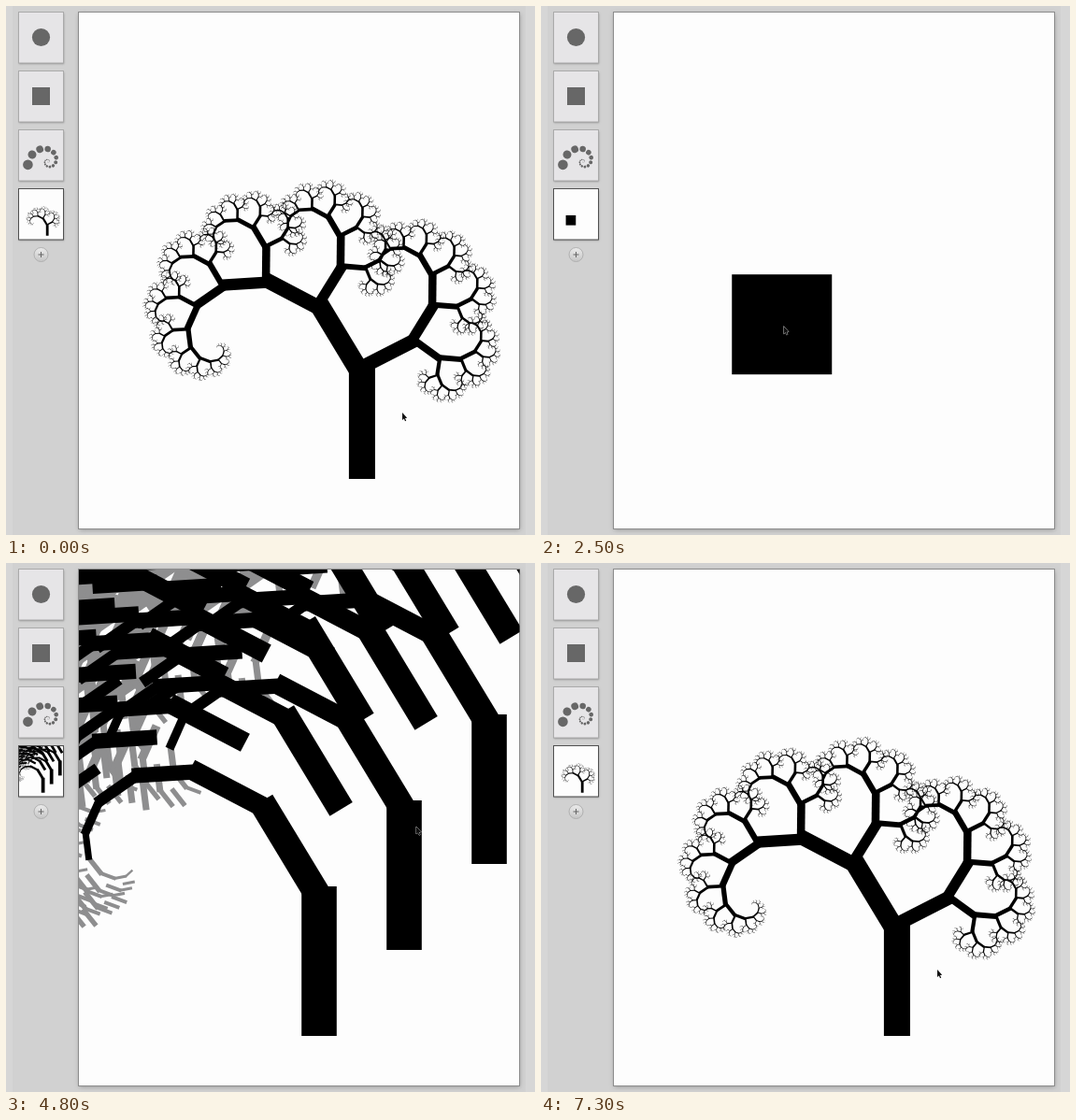
These frames come from a looping animation (566x566 px, 7500 ms). An HTML page with a canvas:

```html
<!DOCTYPE html>
<html lang="en">
<head>
<meta charset="utf-8">
<title>Recursive drawing</title>
<style>
  html, body { margin: 0; width: 100%; height: 100%; overflow: hidden; background: #d1d1d1; }
  canvas { display: block; width: 566px; height: 566px; }
</style>
</head>
<body>
<canvas id="stage" width="566" height="566"></canvas>
<script>
const ctx = document.getElementById('stage').getContext('2d');
const LOOP = 7500, STEP = 100, LAST = 7300;
const PAGE = { x: 78, y: 7, w: 471.5, h: 552.5 };
const ICON = '#676767', RED = '#8d0000', DARK = '#5a0000', GRAY = '#8e8e8f';
const HUB = { x: 172.5, y: 376.5 }, TRUNK = { x: 335, y: 426 };
const ZOOM_AT = { x: 515, y: 506 };

const between = (t, from, to) => t >= from && t < to;

function phase(t, from, to) {
  const k = Math.min(1, Math.max(0, (t - from) / (to - from)));
  return k * k * (3 - 2 * k);
}

// Blends a pose towards each goal in turn.
function moves(t, pose, ...goals) {
  const now = { ...pose };
  for (const { from, to, ...goal } of goals) {
    const k = phase(t, from, to);
    for (const key in goal) now[key] += (goal[key] - now[key]) * k;
  }
  return now;
}

// Everything is dragged out of its thumbnail in the palette.
const inPalette = index => ({ x: 37, y: 34 + 63 * index, scale: 1, deg: 0 });

const poses = {
  circle: t => moves(t, inPalette(0), { from: 200, to: 500, ...HUB }),
  spiral: t => moves(t, inPalette(2),
    { from: 600, to: 900, x: 218.3, y: 288.5 },
    { from: 1000, to: 1200, scale: .781, deg: 5.05 },
    { from: 1200, to: 1900, scale: .836, deg: 31.85 },
    { from: 1900, to: 2200, y: 268, scale: .85, deg: 32.5 }),
  square: t => moves(t, { ...inPalette(1), w: 107, h: 107 },
    { from: 2300, to: 2600, ...TRUNK },
    { from: 2650, to: 2850, w: 37.6, h: 160 }),
  left: t => moves(t, inPalette(3),
    { from: 2850, to: 3100, x: 276, y: 333 },
    { from: 3300, to: 3900, scale: .757, deg: -31.2 },
    { from: 3900, to: 4200, x: 304.4, y: 306.8 }),
  right: t => moves(t, inPalette(3),
    { from: 4400, to: 4800, x: 426, y: 334 },
    { from: 4850, to: 5300, scale: .56, deg: 58.2 },
    { from: 5400, to: 6300, x: 372.4, y: 326.5, scale: .53, deg: 63 })
};

// Similarity that carries the pivot to the pose, scaled and turned.
function similarity(pivot, { x, y, scale, deg }) {
  const angle = deg * Math.PI / 180;
  const a = scale * Math.cos(angle), b = scale * Math.sin(angle);
  return { a, b, x: x - a * pivot.x + b * pivot.y, y: y - b * pivot.x - a * pivot.y };
}

function compose(p, q) {
  return {
    a: p.a * q.a - p.b * q.b, b: p.a * q.b + p.b * q.a,
    x: p.a * q.x - p.b * q.y + p.x, y: p.b * q.x + p.a * q.y + p.y
  };
}

// Breadth-first list of nested instances, up to a budget.
function grow(pivot, base, copies, budget, minScale) {
  if (base.x < PAGE.x) return [];
  const links = copies.filter(pose => pose.x > PAGE.x).map(pose => similarity(pivot, pose));
  const nodes = [{ a: 1, b: 0, x: 0, y: 0, depth: 0, root: -1, chain: true }];
  for (let i = 0; i < nodes.length; i++) {
    const node = nodes[i];
    links.forEach((link, n) => {
      const child = compose(node, link);
      if (nodes.length >= budget || Math.hypot(child.a, child.b) < minScale) return;
      child.depth = node.depth + 1;
      child.root = node.depth ? node.root : n;
      child.chain = node.depth === 0 || (node.chain && n === 0);
      nodes.push(child);
    });
  }
  return nodes;
}

function spiralScene(t) {
  const circle = poses.circle(t);
  const shape = k => {
    ctx.beginPath();
    ctx.arc(circle.x, circle.y, 53.4 * k, 0, 7);
    ctx.fill();
  };
  return {
    shape, zoom: 1, hover: between(t, 1000, 2300) ? 0 : -1, edgeDepth: 1, grayFrom: Infinity,
    nodes: grow(HUB, circle, [poses.spiral(t)], 60, .012)
  };
}

function treeScene(t) {
  const { w, h, ...square } = poses.square(t);
  const shape = k => ctx.fillRect(square.x - w * k / 2, square.y - h * k / 2, w * k, h * k);
  const zoom = 1 - .255 * phase(t, 6400, 7000);
  const busy = between(t, 2850, 4200) || between(t, 4400, 6300);
  const hover = between(t, 3300, 4200) ? 0 : between(t, 4850, 6300) ? 1 : -1;
  const budget = !busy ? 20000 : t < 5000 ? 1200 : 300;
  return {
    shape, zoom, hover, edgeDepth: 3, grayFrom: busy ? 7 : Infinity,
    nodes: grow(TRUNK, square, [poses.left(t), poses.right(t)], budget, .8 / 160 / zoom)
  };
}

function drawNode(node, scene, tint) {
  const hot = node.root === scene.hover && scene.hover >= 0;
  const gray = node.depth >= scene.grayFrom;
  const edge = hot && !gray && node.chain && node.depth <= scene.edgeDepth;
  ctx.save();
  ctx.transform(node.a, node.b, -node.b, node.a, node.x, node.y);
  ctx.fillStyle = tint || (gray ? GRAY : edge ? RED : hot ? DARK : '#000');
  scene.shape(1);
  if (edge && !tint) {
    ctx.fillStyle = DARK;
    scene.shape(.7);
  }
  ctx.restore();
}

function drawScene(scene, box, tint) {
  const k = box.w / PAGE.w;
  ctx.save();
  ctx.beginPath();
  ctx.rect(box.x, box.y, box.w, box.h);
  ctx.clip();
  ctx.translate(box.x, box.y);
  ctx.scale(k, k);
  ctx.translate(ZOOM_AT.x - PAGE.x, ZOOM_AT.y - PAGE.y);
  ctx.scale(scene.zoom, scene.zoom);
  ctx.translate(-ZOOM_AT.x, -ZOOM_AT.y);
  const faint = scene.nodes.filter(n => n.depth >= scene.grayFrom);
  const solid = scene.nodes.filter(n => n.depth < scene.grayFrom);
  [...faint, ...solid].forEach(n => drawNode(n, scene, tint));
  ctx.restore();
}

function panel(x, y, w, h, fill, stroke, blur) {
  ctx.save();
  ctx.shadowColor = 'rgba(0,0,0,.3)';
  ctx.shadowBlur = blur;
  ctx.shadowOffsetY = 1;
  ctx.fillStyle = fill;
  ctx.fillRect(x, y, w, h);
  ctx.restore();
  ctx.strokeStyle = stroke;
  ctx.lineWidth = 1;
  ctx.strokeRect(x, y, w, h);
}

function thumb(index, selected) {
  const y = 6.5 + 63 * index;
  panel(13.5, y, 48, 54.5, selected ? '#fdfdfd' : '#e6e5e7', selected ? '#505050' : '#aaaaaa', 2);
  return { x: 14, y: y + .5, w: 47, h: 53.5 };
}

function plusButton(y) {
  const shade = ctx.createLinearGradient(0, y - 8, 0, y + 8);
  shade.addColorStop(0, '#ededed');
  shade.addColorStop(1, '#c4c4c4');
  ctx.beginPath();
  ctx.arc(37.5, y, 7.5, 0, 7);
  ctx.fillStyle = shade;
  ctx.fill();
  ctx.strokeStyle = '#b0b0b0';
  ctx.stroke();
  ctx.fillStyle = '#666';
  ctx.fillRect(34.5, y - .5, 6, 1);
  ctx.fillRect(37, y - 3, 1, 6);
}

// The pointer stays on the grip of whatever is being handled.
function cursorAt(t) {
  const hold = (pose, x, y) => {
    const { a, b } = similarity(pose, pose);
    return { x: pose.x + a * x - b * y, y: pose.y + b * x + a * y };
  };
  if (t < 600) return hold(poses.circle(t), 3, 3);
  if (t < 2300) return hold(poses.spiral(t), 39.6, 26.3);
  if (t < 2850) return hold(poses.square(t), 2, 2);
  if (t < 4400) return hold(poses.left(t), 18, 19);
  const grip = moves(t, { x: 13, y: -52 }, { from: 4800, to: 4900, x: -7, y: 69 });
  const held = hold(poses.right(t), grip.x, grip.y);
  return moves(t, held, { from: 6400, to: 7000, x: 424, y: 435 });
}

function drawCursor({ x, y }) {
  ctx.save();
  ctx.translate(x, y);
  const arrow = new Path2D('M0 0V8L1.8 6.4 3 9.2 4.2 8.7 3 6 5.2 5.8Z');
  ctx.strokeStyle = 'rgba(255,255,255,.7)';
  ctx.lineWidth = 1;
  ctx.stroke(arrow);
  ctx.fillStyle = '#111';
  ctx.fill(arrow);
  ctx.restore();
}

function draw(t) {
  const onTree = t >= 2300;
  const spiral = spiralScene(t);
  const scene = onTree ? treeScene(t) : spiral;

  ctx.fillStyle = '#d1d1d1';
  ctx.fillRect(0, 0, 566, 566);
  ctx.fillStyle = '#d6d6d6';
  ctx.fillRect(0, 0, 7, 566);
  ctx.fillRect(556, 0, 10, 566);
  panel(77.5, 6.5, 472, 553, '#fdfdfd', '#8c8c8c', 5);
  drawScene(scene, PAGE);

  thumb(0);
  ctx.fillStyle = ICON;
  ctx.beginPath();
  ctx.arc(37.5, 33.5, 9.6, 0, 7);
  ctx.fill();
  thumb(1);
  ctx.fillStyle = ICON;
  ctx.fillRect(28, 87, 19, 19);
  drawScene(spiral, thumb(2, !onTree), onTree ? ICON : null);
  if (onTree) drawScene(scene, thumb(3, true));
  plusButton(onTree ? 266 : 203);
  drawCursor(cursorAt(t));
}

let shown = -1;
const start = performance.now();
function tick() {
  const now = Math.max(0, performance.now() - start) % LOOP;
  const t = Math.min(LAST, Math.floor(now / STEP) * STEP) || LAST;
  if (t !== shown) draw(shown = t);
  requestAnimationFrame(tick);
}
tick();
</script>
</body>
</html>
```
